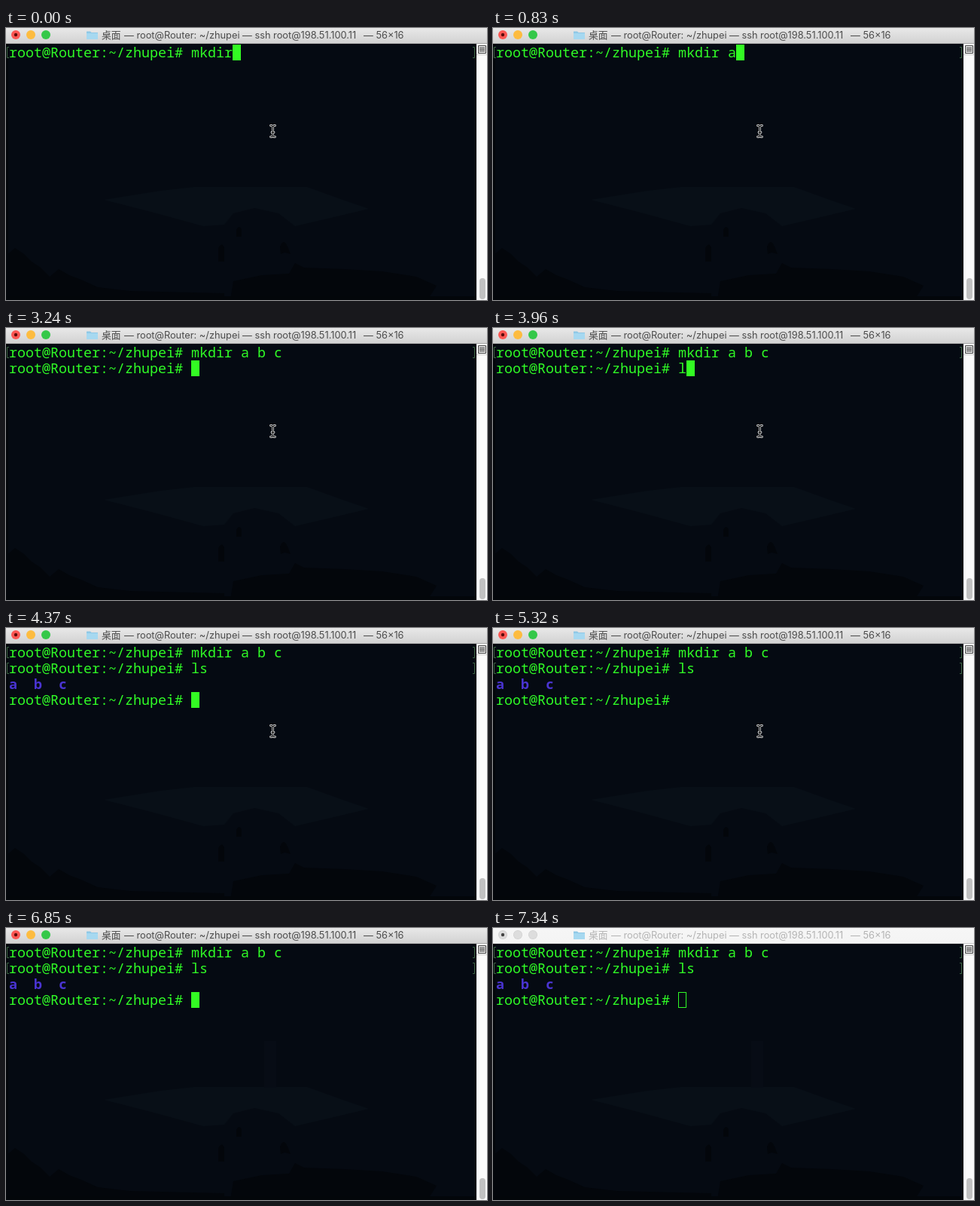
Recreate the animation shown at these times as an HTML page with a canvas. Size 639 by 361 pixels, loop 7.38 s.

```html
<!DOCTYPE html>
<html lang="zh">
<head>
<meta charset="utf-8">
<title>Terminal</title>
<style>
  html, body { margin: 0; width: 100%; height: 100%; overflow: hidden; background: #050a12; }
  canvas { display: block; }
</style>
</head>
<body>
<canvas id="stage" width="639" height="361"></canvas>
<script>
const ctx = document.getElementById('stage').getContext('2d');
const LOOP = 7380, CELL = 11, ROW = 21, LEFT = 4, TOP = 22;
const GREEN = '#30fb26', PROMPT = 'root@Router:~/zhupei# ';
const MONO = '18.33px "Noto Sans Mono", "DejaVu Sans Mono", monospace';
const POINTER_END = 6250, BLUR = 7340;

// Each step: start time, typed text, cursor shown
const FIRST = [
  [0, 'mkdir', 1], [290, 'mkdir ', 1], [830, 'mkdir a', 1], [1360, 'mkdir a', 0],
  [1570, 'mkdir a ', 1], [2110, 'mkdir a b', 1], [2520, 'mkdir a b ', 1],
  [2760, 'mkdir a b c', 1], [3240, 'mkdir a b c', 0]
];
const SECOND = [[3240, '', 1], [3960, 'l', 1], [4130, 'ls', 1], [4310, 'ls', 0]];
const THIRD = [[4370, '', 1], [5320, '', 0], [5890, '', 1], [6370, '', 0], [6850, '', 1]];

function rect(x, y, w, h, color) {
  ctx.fillStyle = color;
  ctx.fillRect(x, y, w, h);
}

function disc(x, y, r, color) {
  ctx.fillStyle = color;
  ctx.beginPath();
  ctx.arc(x, y, r, 0, 7);
  ctx.fill();
}

function shape(path, color) {
  ctx.fillStyle = color;
  ctx.fill(new Path2D(path));
}

function stroke(path, color, width) {
  ctx.strokeStyle = color;
  ctx.lineWidth = width;
  ctx.stroke(new Path2D(path));
}

function cells(text, row, color = GREEN, weight = '500 ') {
  ctx.font = weight + MONO;
  ctx.fillStyle = color;
  [...text].forEach((ch, i) => ctx.fillText(ch, LEFT + i * CELL, TOP + row * ROW + 17));
}

function cursor(col, row, focused) {
  const x = LEFT + col * CELL, y = TOP + row * ROW;
  if (focused) return rect(x, y, CELL, ROW, '#33fb23');
  ctx.strokeStyle = GREEN;
  ctx.lineWidth = 1;
  ctx.strokeRect(x + .5, y + .5, CELL - 1, ROW - 1);
}

function brackets(row) {
  const y = TOP + row * ROW + 3.5;
  stroke(`M4 ${y}H1.5v14H4M620 ${y}h2.5v14h-2.5`, '#3c6544', 1);
}

function promptLine(steps, row, t) {
  const step = steps.filter(s => s[0] <= t).pop();
  if (!step) return;
  const text = PROMPT + step[1];
  cells(text, row);
  if (step[2]) cursor(text.length, row, t < BLUR);
}

function backdrop(t) {
  rect(0, 20, 639, 341, '#050a12');
  rect(0, 20, 3, 341, '#03060b');
  shape('M130 228L205 216 250 211H400L450 229 482 240 440 250 384 263 362 246 330 239 302 246 290 261 262 263 200 246Z', '#080f17');
  if (t >= POINTER_END) rect(343, 150, 16, 62, '#070c15');
  shape('M0 302L12 292 24 300 34 310 46 318 58 330 70 320 84 328 100 334 122 344 165 349 290 352 290 361H0Z', '#03060b');
  shape('M282 292q5-9 8 0v18h-8ZM364 290q5-12 10 0l4 10-8-2-5 2ZM306 268q4-8 7 0v9h-7Z', '#03060b');
  shape('M298 361L302 336 340 328 376 326 384 312 396 318 450 320 500 323 545 330 572 342 560 361Z', '#03060b');
  rect(0, 356, 625, 5, '#03060a');
}

function scrollbar() {
  rect(625, 20, 14, 341, '#fafafa');
  rect(627, 23, 11, 11, '#d8d8d8');
  stroke('M627.5 23.5h10v10h-10ZM629 26.5h7M629 28.5h7M629 30.5h7', '#484848', 1);
  rect(625, 35, 14, 1, '#d0d0d0');
  ctx.fillStyle = '#c1c1c1';
  ctx.beginPath();
  ctx.roundRect(629, 332, 8, 28, 4);
  ctx.fill();
}

function titleBar(focused) {
  const fade = ctx.createLinearGradient(0, 0, 0, 20);
  fade.addColorStop(0, focused ? '#e8e8e8' : '#f6f6f6');
  fade.addColorStop(1, focused ? '#d2d2d2' : '#f4f4f4');
  rect(0, 0, 639, 20, fade);
  rect(0, 20, 639, 1, focused ? '#a9a9a9' : '#cfcfcf');
  ['#fc5753', '#fdbc40', '#34c84a'].forEach((color, i) => {
    disc(13 + 20 * i, 9, 6, focused ? color : '#d0d0d0');
    if (!focused) disc(13 + 20 * i, 9, 5.3, '#dddddd');
  });
  disc(13, 9, 2.2, focused ? '#5c0c0a' : '#444');
  shape('M107 4.5h5l1.5 1.5H122v9H107Z', '#8fc8e6');
  rect(107, 7, 15, 8, '#a6d8f0');
  ctx.font = '12.8px Inter, "Noto Sans CJK SC", "Noto Sans CJK", sans-serif';
  ctx.fillStyle = focused ? '#4c4c4c' : '#b4b4b4';
  [['桌面', 127], ['— root@Router: ~/zhupei', 157], ['— ssh root@198.51.100.11', 314], ['— 56×16', 475]]
    .forEach(([text, x]) => ctx.fillText(text, x, 14));
}

function pointer() {
  const beam = 'M351.5 129.5h1.5l1.5 1.5 1.5-1.5h1.5M354.5 131v12M351.5 144.5h1.5l1.5-1.5 1.5 1.5h1.5M353 138.5h3';
  ctx.lineCap = 'round';
  stroke(beam, '#d0d0d0', 2.8);
  stroke(beam, '#101010', 1.1);
  ctx.lineCap = 'butt';
}

function draw(now) {
  const t = now % LOOP;
  backdrop(t);
  brackets(0);
  promptLine(FIRST, 0, t);
  promptLine(SECOND, 1, t);
  if (t >= 4310) brackets(1);
  if (t >= 4370) cells('a  b  c', 2, '#4a34d2', 'bold ');
  else if (t >= 4310) cursor(0, 2, true);
  promptLine(THIRD, 3, t);
  scrollbar();
  titleBar(t < BLUR);
  if (t < POINTER_END) pointer();
}

const start = performance.now();
function tick() {
  draw(performance.now() - start);
  requestAnimationFrame(tick);
}
tick();
</script>
</body>
</html>
```
